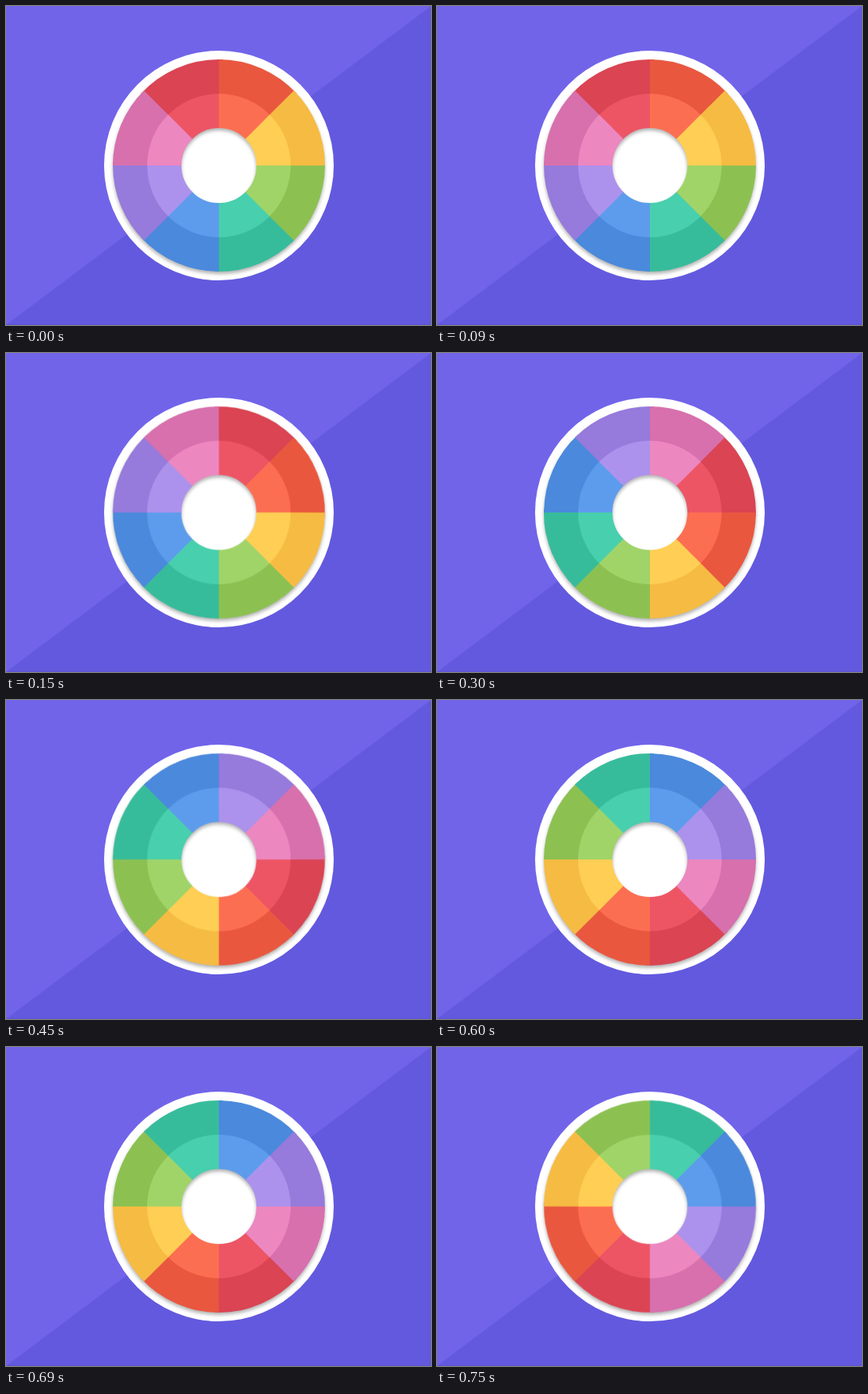
Recreate the animation shown at these times as an HTML page. Size 533 by 400 pixels, loop 0.9 s.

```html
<!DOCTYPE html>
<html lang="en">
<head>
<meta charset="utf-8">
<title>Colour wheel</title>
<style>
  html, body { margin: 0; width: 100%; height: 100%; overflow: hidden; background: #6359de; }
  svg { display: block; width: 533px; height: 400px; }
  .disc { filter: drop-shadow(0 3px 2px rgba(0, 0, 0, .3)); }
  #wheel { fill: none; transform-origin: 0 0; }
</style>
</head>
<body>
<svg viewBox="0 0 533 400">
  <rect width="533" height="400" fill="#6359de"/>
  <path d="M0 0H533L0 400Z" fill="#7164e9"/>
  <rect y="399" width="533" height="1" fill="#000" opacity=".06"/>
  <g transform="translate(267 200)">
    <circle r="144" fill="#fff"/>
    <g class="disc"><g id="wheel"></g></g>
  </g>
</svg>
<script>
  // Clockwise from twelve o'clock: [outer, inner]
  const COLORS = [
    ['#e9573f', '#fc6e51'], ['#f6bb42', '#ffce54'],
    ['#8cc152', '#a0d468'], ['#37bc9b', '#48cfad'],
    ['#4a89dc', '#5d9cec'], ['#967adc', '#ac92ec'],
    ['#d770ad', '#ec87c0'], ['#da4453', '#ed5565']
  ];
  const COUNT = COLORS.length;
  const LAST = COUNT - 1;
  const wheel = document.getElementById('wheel');

  function addArc(color, inner, outer, start, length) {
    const arc = document.createElementNS('http://www.w3.org/2000/svg', 'circle');
    const attributes = {
      r: (inner + outer) / 2,
      stroke: color,
      'stroke-width': outer - inner,
      pathLength: COUNT,
      'stroke-dasharray': `${length} ${COUNT - length}`,
      'stroke-dashoffset': -start,
      transform: 'rotate(-90)'
    };
    for (const name in attributes) arc.setAttribute(name, attributes[name]);
    wheel.append(arc);
  }

  // Neighbours overlap slightly so that no seams show between them.
  function addRing(tone, inner, outer) {
    addArc(COLORS[LAST][tone], inner, outer, LAST - .05, 1.1);
    for (let i = 0; i < LAST; i++) {
      addArc(COLORS[i][tone], inner, outer, i, i < LAST - 1 ? 1.05 : 1);
    }
  }

  addRing(0, 88, 133);
  addRing(1, 47, 90);

  // Six held poses, an eighth of a turn apart.
  wheel.animate(
    { transform: ['rotate(0deg)', 'rotate(270deg)'] },
    { duration: 900, iterations: Infinity, easing: 'steps(6)' }
  );
</script>
</body>
</html>
```
